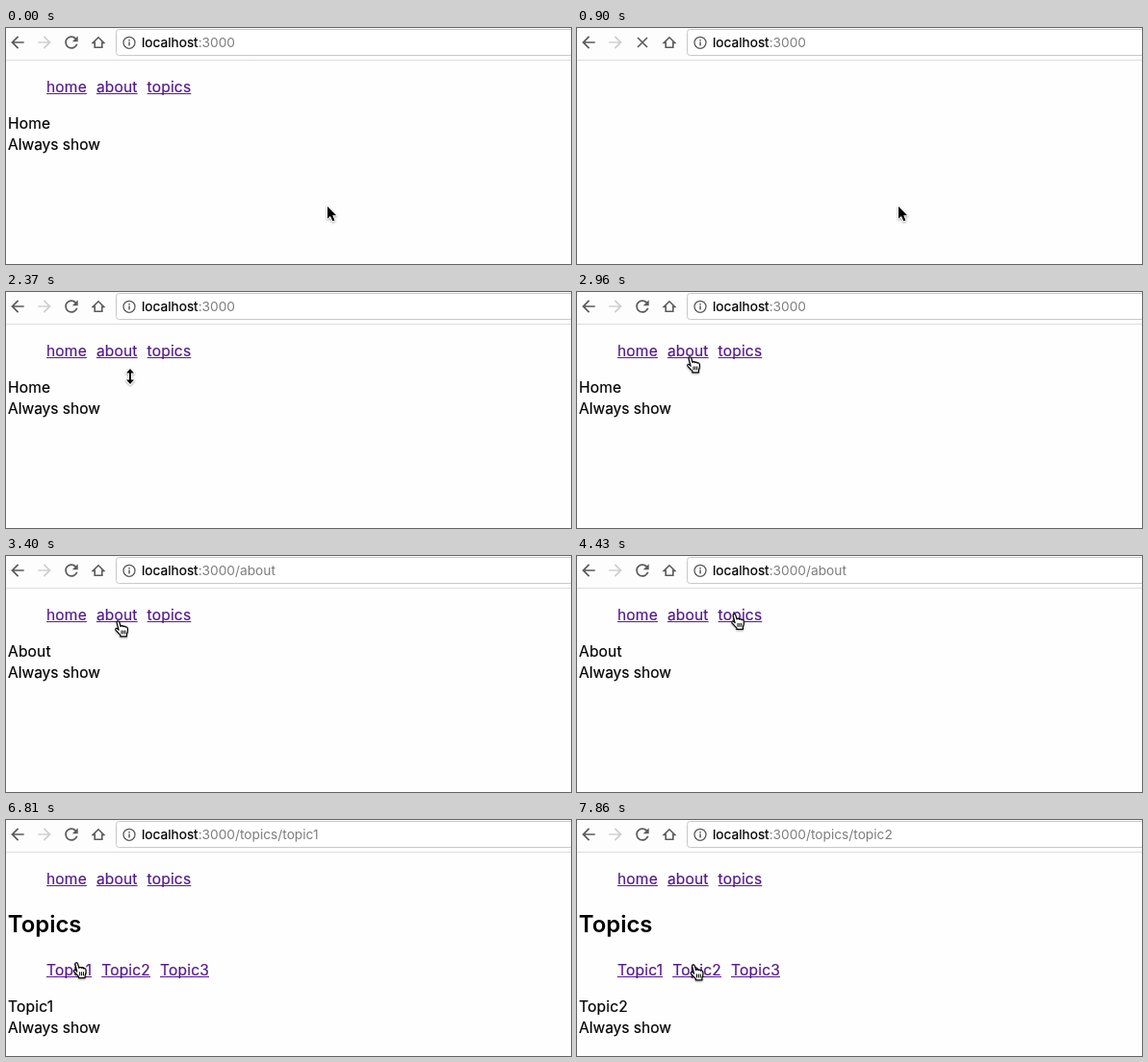
Recreate the animation shown at these times as an HTML page. Size 587 px wide and 246 px high, loop 8 s.

```html
<!DOCTYPE html>
<html lang="en">
<head>
<meta charset="utf-8">
<title>Router demo</title>
<style>
  html, body { margin: 0; width: 100%; height: 100%; overflow: hidden; background: #fefefe; }
  svg { display: block; width: 587px; height: 246px; }
  text { font: 15.5px Inter, sans-serif; font-optical-sizing: none; fill: #000; stroke: #000; stroke-width: .2; white-space: pre; }
  .link { fill: #551a8b; stroke: #551a8b; }
  rect.link { stroke: none; }
  .link, #view { letter-spacing: .2px; }
  .title { font-size: 23.9px; font-weight: 600; stroke: none; }
  .url { font-size: 13.72px; }
  .rest { fill: #7d7d7d; stroke: none; }
  .icon { fill: #5a5a5a; }
  .line { fill: none; stroke: #5a5a5a; stroke-width: 1.6; }
  #cursor { filter: drop-shadow(0 1px .8px rgba(0, 0, 0, .35)); }
  .dark { fill: #000; stroke: #fff; stroke-width: 2; stroke-linejoin: round; paint-order: stroke; }
</style>
</head>
<body>
<svg viewBox="0 0 587 246">
  <defs>
    <path id="back" d="M8 -1H-4.17L1.42 -6.59 0 -8-8 0 0 8 1.41 6.59-4.17 1H8z"/>
  </defs>

  <rect width="587" height="33" fill="#fdfdfd"/>
  <path d="M0 33.5H587" stroke="#dcdcdc"/>
  <rect x="114.5" y="1.5" width="480" height="27" rx="3" fill="#fff" stroke="#c8c8c8"/>
  <use href="#back" class="icon" transform="translate(12 15) scale(.84)"/>
  <use href="#back" fill="#cfcfcf" transform="translate(40 15) scale(-.84 .84)"/>
  <path id="reload" class="icon" transform="translate(57.9 4.9) scale(.84)"
    d="M17.65 6.35C16.2 4.9 14.21 4 12 4c-4.42 0-8 3.58-8 8s3.58 8 8 8c3.73 0 6.84-2.55 7.73-6h-2.08c-.82 2.33-3.04 4-5.65 4-3.31 0-6-2.69-6-6s2.69-6 6-6c1.66 0 3.14.69 4.22 1.78L13 11h7V4z"/>
  <path id="stop" class="line" d="M63 10l10 10M73 10l-10 10"/>
  <path class="line" d="M90.4 15.4L96 9.8l5.6 5.6H99.8V20.3H92.2V15.4Z"/>
  <circle class="line" cx="128" cy="15.3" r="6" style="stroke-width:1.3"/>
  <path class="icon" d="M127.3 12h1.5v1.5h-1.5zM127.3 14.5h1.5v4h-1.5z"/>
  <text class="url" x="141" y="20.4">localhost<tspan id="path" class="rest"></tspan></text>

  <g id="page">
    <g id="nav"></g>
    <g id="topics"><text class="title" x="1.8" y="117">Topics</text></g>
    <text id="view" x="2"></text>
    <text id="always" x="2">Always show</text>
  </g>

  <g id="cursor">
    <path id="arrow" class="dark" transform="scale(.9)" d="M0 0V14.2L3.3 11.2 5.9 17 8.3 16 5.8 10.3H10.2Z"/>
    <path id="resize" class="dark" d="M0 -8L4 -3.6H1V3.6H4L0 8-4 3.6H-1V-3.6H-4Z"/>
    <g id="hand" stroke="#000" stroke-width="1.2" stroke-linejoin="round" stroke-linecap="round">
      <path fill="#fff" d="M4.6 10.2L2.7 2.8C2.3 .6 4.7 .2 5.3 2.1L6.6 6.5C7.2 5.3 8.7 5.5 9.1 6.6 9.8 5.7 11.2 6 11.5 7.2 12.5 6.5 13.6 7.1 13.8 8.3 14.1 10.4 14 12.6 12.9 14.4V16.9H6.4V15.4C4.6 14 3 11.9 1.6 10.3 .6 8.9 2.2 7.7 3.3 8.8Z"/>
      <path fill="none" stroke-width="1" d="M7.5 10.9V14M9.4 10.9V14M11.3 10.9V14"/>
    </g>
  </g>
</svg>
<script>
const LOOP = 8000;
const NS = "http://www.w3.org/2000/svg";
const $ = id => document.getElementById(id);

// time, cursor shape, x, y
const moves = [
  [0, "arrow", 334, 186],
  [1050, "arrow", 306, 181],
  [1190, "arrow", 270, 174],
  [1340, "resize", 257, 172],
  [1630, "resize", 196, 138],
  [1780, "resize", 161, 123],
  [2080, "resize", 149, 108],
  [2220, "resize", 137, 96],
  [2370, "resize", 129, 88],
  [2520, "resize", 126, 83],
  [2670, "hand", 116, 67],
  [2810, "hand", 114.5, 67],
  [2960, "hand", 113.5, 67],
  [3100, "hand", 112.5, 67],
  [4140, "hand", 127, 65],
  [4280, "hand", 149, 61],
  [4430, "hand", 159.5, 59.5],
  [5630, "arrow", 150, 101],
  [5780, "arrow", 122, 126],
  [5920, "hand", 86, 149],
  [6070, "hand", 74, 148.5],
  [6220, "hand", 69.2, 147.8],
  [7410, "hand", 84, 149],
  [7560, "hand", 106, 150],
  [7710, "hand", 117, 150]
];

// time, path, view text, topics list open
const routes = [
  [0, "", "Home", false],
  [3400, "/about", "About", false],
  [4880, "/topics", "", true],
  [6810, "/topics/topic1", "Topic1", true],
  [7860, "/topics/topic2", "Topic2", true]
];

const at = (list, t) => list.findLast(row => row[0] <= t);
const show = (id, on) => { $(id).style.display = on ? "" : "none"; };

function add(parent, tag, attrs) {
  const el = parent.appendChild(document.createElementNS(NS, tag));
  for (const key in attrs) el.setAttribute(key, attrs[key]);
  return el;
}

function addLinks(parent, y, names) {
  let x = 42;
  for (const name of names) {
    const label = add(parent, "text", { class: "link", x, y });
    label.textContent = name;
    const width = label.getComputedTextLength();
    add(parent, "rect", { class: "link", x, y: y + 1, width, height: 1 });
    x += width + 10;
  }
}

function draw(t) {
  const [, path, view, open] = at(routes, t);
  $("path").textContent = ":3000" + path;
  $("view").textContent = view;
  $("view").setAttribute("y", open ? 200 : 105);
  $("always").setAttribute("y", open ? (view ? 222 : 200) : 127);
  show("topics", open);

  const loading = t >= 600 && t < 1050;
  show("reload", !loading);
  show("stop", loading);
  show("page", t < 900 || t >= 1050);

  const [, shape, x, y] = at(moves, t);
  for (const id of ["arrow", "resize", "hand"]) show(id, id === shape);
  $("cursor").setAttribute("transform", `translate(${x} ${y})`);
}

addLinks($("nav"), 67, ["home", "about", "topics"]);
addLinks($("topics"), 162, ["Topic1", "Topic2", "Topic3"]);

const start = performance.now();
function tick() {
  draw((performance.now() - start) % LOOP);
  requestAnimationFrame(tick);
}
tick();
</script>
</body>
</html>
```
